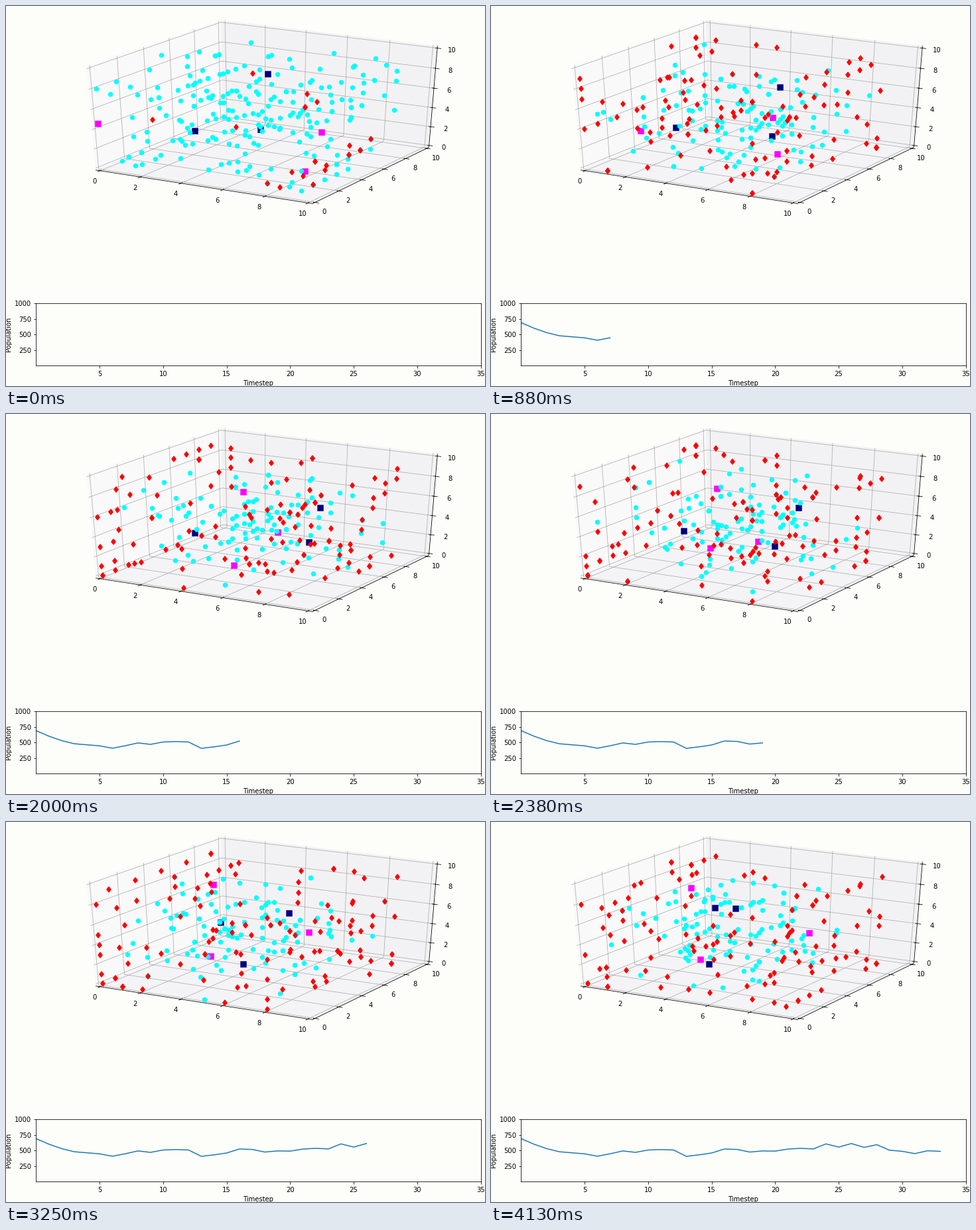
Recreate the animation shown at these times as a matplotlib script. Size 722 by 574 pixels, loop 4.26 s.

```python
import numpy as np
import matplotlib.pyplot as plt
from matplotlib.animation import FuncAnimation

W, H, DPI = 722, 574, 72
LOOP_MS, TICK_MS, STEP_MS = 4260, 20, 125
STEPS = 34
BG = "#fdfef9"
LO, HI = -10 / 48, 10 + 10 / 48  # box walls, a little outside 0..10

# The plotted series, one value per timestep.
POPULATION = [690, 602, 530, 480, 463, 446, 408, 447, 493, 470, 508, 515,
              508, 406, 430, 460, 524, 517, 475, 493, 490, 523, 535, 525,
              606, 555, 612, 550, 593, 505, 487, 450, 496, 486]

# Where each square starts, is half way through, and ends.
NAVY = [[(395, 103), (474, 142), (369, 131)],
        [(285, 189), (285, 180), (338, 130)],
        [(384, 187), (457, 194), (329, 215)]]
MAGENTA = [[(139, 178), (344, 229), (316, 208)],
           [(476, 191), (358, 118), (302, 100)],
           [(451, 250), (410, 179), (480, 168)]]

rng = np.random.default_rng(12)
steps = np.arange(STEPS)


def project(points):
    """Perspective view of the 0..10 cube (azimuth -60, elevation 30) in pixels."""
    d = np.asarray(points, float) / 10 - 0.5
    az, el = np.radians(-60), np.radians(30)
    ca, sa, ce, se = np.cos(az), np.sin(az), np.cos(el), np.sin(el)
    depth = 10 - d @ np.array([ce * ca, ce * sa, se])
    right = d @ np.array([-sa, ca, 0])
    up = d @ np.array([-se * ca, -se * sa, ce])
    return np.stack([390.5 + 3618 * right / depth,
                     155 - 1715 * up / depth], axis=-1)


def random_walk(start, spread, pull):
    """Grid positions for every step; pull > 0 gathers them, < 0 scatters them."""
    path = [start]
    for _ in steps[1:]:
        p = path[-1]
        hop = np.rint(rng.normal(0, spread, p.shape) - pull * (p - 4.5))
        path.append(np.clip(p + hop, 0, 9))
    return path


def square_paths(keys):
    """Pixel positions per step: a wandering line through the key points."""
    times = [0, 16, STEPS - 1]
    paths = np.array([[np.interp(steps, times, axis) for axis in zip(*row)]
                      for row in keys])
    wander = rng.normal(0, 10, paths.shape)
    wander[:, :, times] = 0
    return paths + wander


# Cyan thins out quickly while red multiplies.
decay = np.exp(-steps / 2.5)
cyan_n = np.rint(115 + 100 * decay).astype(int)
red_n = np.rint(115 - 93 * decay).astype(int)

cyan_walk = random_walk(rng.integers(0, 10, (cyan_n[0], 3)), 0.8, 0.07)
red_start = rng.integers(0, 10, (red_n.max(), 3))
red_start[:14] = rng.integers((8, 0, 0), (10, 10, 2), (14, 3))  # low right edge
red_walk = random_walk(red_start, 0.9, -0.05)
navy_path, magenta_path = square_paths(NAVY), square_paths(MAGENTA)

fig = plt.figure(figsize=(W / DPI, H / DPI), dpi=DPI, facecolor=BG)
scene = fig.add_axes([0, 0, 1, 1])
scene.set(xlim=(0, W), ylim=(H, 0))
scene.axis("off")


def draw_lines(paths, color, z):
    """Draw several 3D polylines as one artist."""
    gap = [[np.nan, np.nan]]
    xy = np.vstack([np.vstack([project(p), gap]) for p in paths])
    scene.plot(xy[:, 0], xy[:, 1], color=color, lw=0.8, zorder=z)


def draw_labels(points, dx, dy):
    for value, (x, y) in zip(range(0, 11, 2), project(points)):
        scene.text(x + dx, y + dy + 3.6, str(value), fontsize=10,
                   ha="center", va="baseline")


def draw_box():
    walls = [
        ("#f9f9fa", [(LO, LO, LO), (LO, HI, LO), (LO, HI, HI), (LO, LO, HI)]),
        ("#f2f2f4", [(LO, HI, LO), (HI, HI, LO), (HI, HI, HI), (LO, HI, HI)]),
        ("#f4f4f7", [(LO, LO, LO), (HI, LO, LO), (HI, HI, LO), (LO, HI, LO)]),
    ]
    for color, corners in walls:
        scene.fill(*project(corners).T, color=color, lw=0, zorder=0)

    ticks = range(0, 11, 2)
    grid = [[(v, LO, LO), (v, HI, LO), (v, HI, HI)] for v in ticks]
    grid += [[(HI, v, LO), (LO, v, LO), (LO, v, HI)] for v in ticks]
    grid += [[(LO, LO, v), (LO, HI, v), (HI, HI, v)] for v in ticks]
    draw_lines(grid, "#b0b0b0", 1)

    inner, outer = 1 / 12, 1 / 6
    edges = [[(LO, LO, LO), (HI, LO, LO), (HI, HI, LO), (HI, HI, HI)]]
    edges += [[(v, LO + inner, LO), (v, LO - outer, LO)] for v in ticks]
    edges += [[(HI - inner, v, LO), (HI + outer, v, LO)] for v in ticks]
    edges += [[(HI - inner, HI, v), (HI + outer, HI, v)] for v in ticks]
    draw_lines(edges, "black", 2)

    draw_labels([(v, LO, LO) for v in ticks], -8.3, 16)
    draw_labels([(HI, v, LO) for v in ticks], 14, 14)
    draw_labels([(HI, HI, v) for v in ticks], 22.3, 3)


def markers(shape, color, size, z):
    return scene.plot([], [], shape, color=color, ms=size, mew=1.5, zorder=z)[0]


draw_box()
navy = markers("s", "navy", 7.2, 3)
magenta = markers("s", "magenta", 7.2, 3)
cyan = markers("o", "cyan", 6, 4)
red = markers("d", "red", 6, 5)

chart = fig.add_axes([45.5 / W, 1 - 543.2 / H, 670 / W, 94 / H], facecolor=BG)
chart.set(xlim=(0, 35), ylim=(0, 1000), xlabel="Timestep", ylabel="Population",
          xticks=range(5, 36, 5), yticks=range(250, 1001, 250))
chart.tick_params(axis="x", pad=4.2)
curve, = chart.plot([], [], color="#1f77b4", lw=1.5)


def update(i):
    step = min(STEPS - 1, (TICK_MS * i + TICK_MS // 2) // STEP_MS)
    cyan.set_data(*project(cyan_walk[step][:cyan_n[step]]).T)
    red.set_data(*project(red_walk[step][:red_n[step]]).T)
    navy.set_data(*navy_path[:, :, step].T)
    magenta.set_data(*magenta_path[:, :, step].T)
    curve.set_data(steps[:step + 1], POPULATION[:step + 1])
    return cyan, red, navy, magenta, curve


anim = FuncAnimation(fig, update, frames=LOOP_MS // TICK_MS, interval=TICK_MS,
                     repeat=True, repeat_delay=0, blit=False)
plt.show()
```
